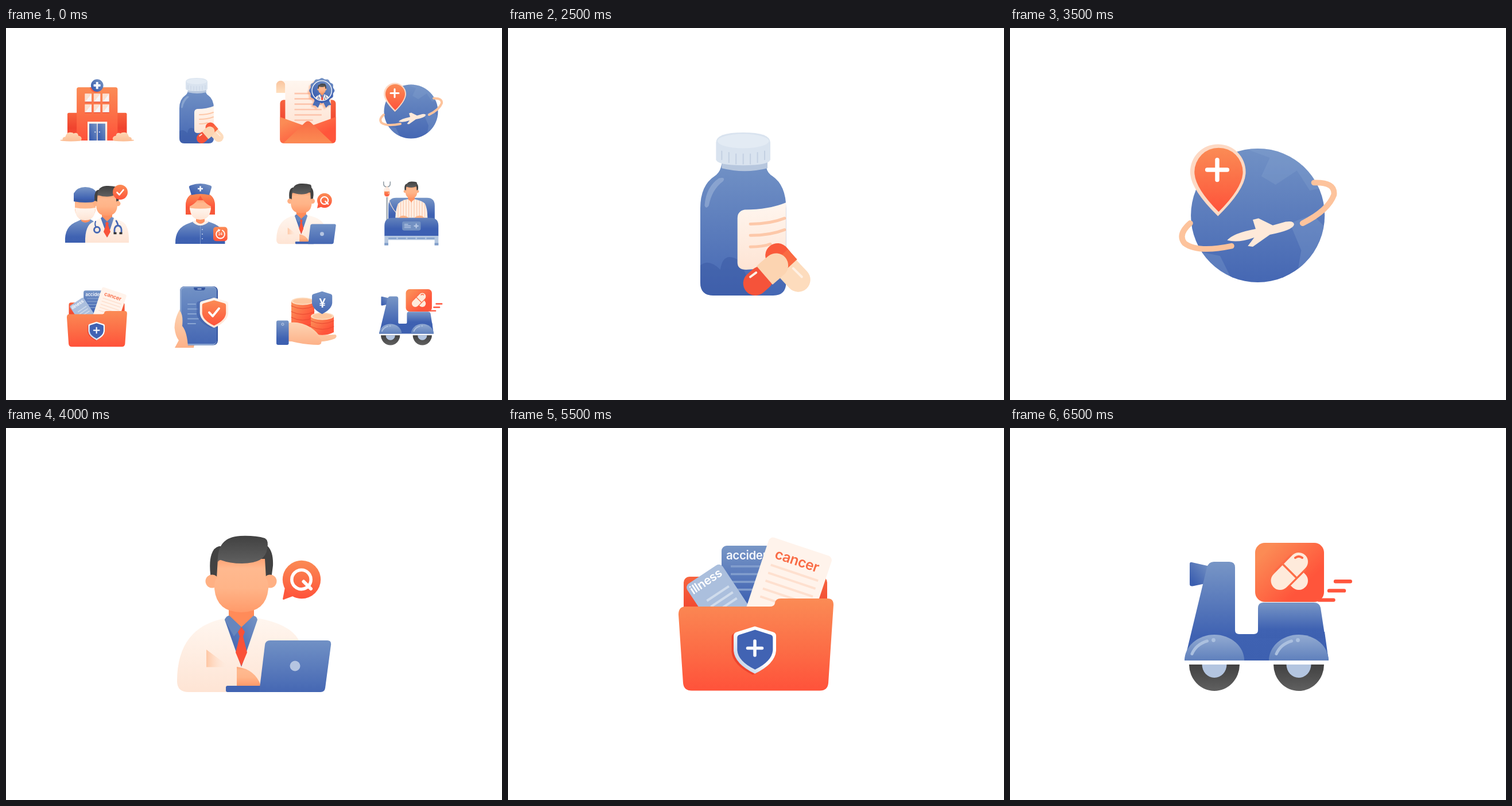
An HTML page that plays this animation: 864x648 px, repeating every 7000 ms.

```html
<!DOCTYPE html>
<html lang="en">
<head>
<meta charset="utf-8">
<title>Medical icons</title>
<style>
html, body { margin: 0; width: 100%; height: 100%; overflow: hidden; background: #fff; }
svg { display: block; width: 864px; height: 648px; }
text { font-family: Inter, "Liberation Sans", sans-serif; font-weight: 600; letter-spacing: -.02em; }
.scene { visibility: hidden; animation: solo 7s step-end infinite; animation-delay: calc(var(--i) * .5s - 5.5s); }
.all { animation-name: all; animation-delay: 0s; }
@keyframes solo { 0% { visibility: visible; } 7.142857%, 100% { visibility: hidden; } }
@keyframes all { 0% { visibility: visible; } 28.571429%, 100% { visibility: hidden; } }
.ln { fill: none; stroke-linecap: round; stroke-linejoin: round; }
</style>
</head>
<body>
<svg viewBox="0 0 864 648">
<defs>
  <linearGradient id="o" x2="0" y2="1"><stop stop-color="#fb8b55"/><stop offset=".55" stop-color="#fc6d46"/><stop offset="1" stop-color="#ff523a"/></linearGradient>
  <linearGradient id="od" x2="1" y2=".9"><stop offset=".15" stop-color="#fb8b55"/><stop offset=".75" stop-color="#ff553b"/></linearGradient>
  <linearGradient id="r" x2="0" y2="1"><stop stop-color="#f7643f"/><stop offset=".55" stop-color="#f0432e"/><stop offset="1" stop-color="#fb573b"/></linearGradient>
  <linearGradient id="flap" x2="0" y2="1"><stop stop-color="#f96b45"/><stop offset=".9" stop-color="#fb8952"/></linearGradient>
  <linearGradient id="b" x2="0" y2="1"><stop stop-color="#7896c6"/><stop offset=".75" stop-color="#3f62b2"/><stop offset="1" stop-color="#3d60b0"/></linearGradient>
  <linearGradient id="bm" x2="0" y2="1"><stop stop-color="#7191c5"/><stop offset="1" stop-color="#4567b3"/></linearGradient>
  <linearGradient id="bd" x1="1" x2="0" y2="1"><stop stop-color="#7895c4"/><stop offset=".85" stop-color="#3c5fb0"/></linearGradient>
  <linearGradient id="bq" x2="0" y2="1"><stop stop-color="#6383bc"/><stop offset=".6" stop-color="#3d60b2"/></linearGradient>
  <linearGradient id="bl" x2="0" y2="1"><stop stop-color="#93abd2"/><stop offset="1" stop-color="#5f80bc"/></linearGradient>
  <linearGradient id="c" x2="0" y2="1"><stop stop-color="#fff6ef"/><stop offset="1" stop-color="#fee4d4"/></linearGradient>
  <linearGradient id="p" x2="0" y2="1"><stop stop-color="#fdd7b5"/><stop offset="1" stop-color="#fcbd94"/></linearGradient>
  <linearGradient id="curl" x2="0" y2="1"><stop stop-color="#f9c49e"/><stop offset="1" stop-color="#ffdfbe"/></linearGradient>
  <linearGradient id="s" x2="0" y2="1"><stop stop-color="#ffa374"/><stop offset=".18" stop-color="#ffb98f"/><stop offset=".55" stop-color="#ffb488"/><stop offset="1" stop-color="#ff9a6a"/></linearGradient>
  <linearGradient id="palm" x2="0" y2="1"><stop stop-color="#fdd3b2"/><stop offset="1" stop-color="#fdb188"/></linearGradient>
  <linearGradient id="h" x2="0" y2="1"><stop stop-color="#414141"/><stop offset="1" stop-color="#606060"/></linearGradient>
  <linearGradient id="fade"><stop stop-color="#fec6a3"/><stop offset="1" stop-color="#fff0e6" stop-opacity="0"/></linearGradient>
  <linearGradient id="w" x1="1" x2="0" y2="1"><stop offset=".5" stop-color="#fff"/><stop offset="1" stop-color="#a9bfe0"/></linearGradient>
  <filter id="soft"><feGaussianBlur stdDeviation="3"/></filter>

  <g id="head">
    <path fill="#424242" d="M357 263Q353 234 358 220Q362 208 371 206H456Q466 216 465 240L462 263z"/>
    <circle cx="359" cy="267" r="11.5" fill="#ffb083"/><circle cx="460" cy="267" r="11.5" fill="#ffb083"/>
    <path fill="url(#s)" d="M367 262L369 228H451L453 262Q457 264 457 280Q453 321 410 321Q367 321 363 280Q363 264 367 262z"/>
    <path fill="url(#h)" d="M369 234Q367 190 408 188Q434 187 451 192Q458 196 455 210Q452 236 411 236Q390 236 374 230Q370 230 369 234z"/>
  </g>

  <g id="pane"><path fill="#e8432c" d="M0 0h29v38h-29z"/><path fill="#f5f6fa" d="M0 0h29v35h-29z"/><path fill="#fddfcd" d="M0 0h29L2 35h-2z"/></g>
  <path id="bush" fill="url(#p)" d="M270 455.500Q271 452 281 452Q279 441 293 440Q297 420 314 420Q325 420 329 425Q347 418 350 435Q364 437 364 448Q363 457 357 458Q315 462 280 458Q271 457 270 455.500z"/>
  <g id="hospital">
    <rect x="302" y="335" width="260" height="121" rx="6" fill="url(#r)"/>
    <path fill="url(#o)" d="M342.500 456V232q0-9 9-9h161q9 0 9 9V456z"/>
    <path fill="#ff5238" opacity=".8" d="M400.500 223A27 27 0 0 0 441 242L432 223z"/>
    <circle cx="432" cy="215" r="27.200" fill="url(#bd)"/>
    <path fill="#f8f8ff" d="M429 199.500h6q2 0 2 2v8.500h8q2 0 2 2v6q0 2-2 2h-8v8.500q0 2-2 2h-6q-2 0-2-2V220h-8.500q-2 0-2-2v-6q0-2 2-2h8.500v-8.500q0-2 2-2z"/>
    <g id="row"><use href="#pane" x="378.700" y="251"/><use href="#pane" x="417.200" y="251"/><use href="#pane" x="455.800" y="251"/></g>
    <use href="#row" y="46.500"/>
    <path fill="url(#c)" d="M390 374h86v82h-86z"/>
    <path fill="url(#bd)" d="M397.500 382h33.500v74h-33.500z"/><path fill="url(#bd)" d="M434.500 382h33.500v74h-33.500z"/>
    <circle cx="423.300" cy="419" r="2.600" fill="#f5f6fa"/><circle cx="442.300" cy="419" r="2.600" fill="#f5f6fa"/>
    <use href="#bush"/><use href="#bush" transform="matrix(-1 0 0 1 864 0)"/>
  </g>

  <g id="bottle">
    <path fill="url(#bm)" d="M302 192V140Q302 124 312 117.500Q316 115 317 109H348Q348 115 352.500 117.500Q362 124 362 140V192Q362 201 353 201H311Q302 201 302 192z"/>
    <path fill="#a3b9db" opacity=".55" d="M305 138Q306 125 315 119Q320 118 318 121Q310 127 308 138Q306 141 305 138z"/>
    <path fill="#35559f" opacity=".45" d="M302 180Q308 175 316 183Q318 169 330 177L340 201H311Q302 201 302 192z"/>
    <path fill="#b7c7de" d="M317 104h32v8q-16 4-32 0z"/>
    <path fill="#d9e3ef" d="M313 94Q313 87 332 87Q351 87 351 94V106Q350 110 332 110Q314 110 313 106z"/>
    <ellipse cx="332" cy="93" rx="18" ry="5" fill="#e3ebf4"/>
    <path class="ln" stroke="#c3d0e2" stroke-width=".8" d="M317 100v6m5-5v7m5-6v7m5-7v7m5-7v7m5-8v7m5-8v6"/>
    <path fill="url(#c)" d="M362 136Q350 141 333 141Q328 142 328 147V178Q328 183 334 183Q352 182 362 178z"/>
    <path class="ln" stroke="#fdc8a9" stroke-width="2" d="M337 151Q351 151 361 147M337 159Q351 159 361 155M337 167Q346 167 351 165"/>
    <path class="ln" stroke="#fa5a3b" stroke-width="17" d="M356 173l5 6"/>
    <path class="ln" stroke="#fddcbd" stroke-width="17" d="M363 182l7.500 8"/>
    <path stroke="#fa6a42" stroke-width="17" d="M357 174.500l6.500 7"/>
    <path class="ln" stroke="#fcd4b1" stroke-width="17" d="M349 185l6-5"/>
    <path class="ln" stroke="#f5533a" stroke-width="17" d="M340.500 192.500l4-3.500"/>
    <path stroke="#fcd4b1" stroke-width="17" d="M347 187l6-5.200"/>
    <path class="ln" stroke="#fff0e3" stroke-width="1.600" d="M367 182l6 6M337 188l4-3"/>
  </g>

  <path id="seal"/>
  <path id="tails" d="M469 280L459.500 302L471 304L482 313L495 284zM527 280L537 301L525 303L515 313L501 284z"/>
  <clipPath id="disc"><circle cx="498" cy="241.500" r="40"/></clipPath>
  <g id="steth" class="ln">
    <path stroke="#3f62b2" stroke-width="2" d="M156 337Q154 343 157 347"/><circle cx="158.500" cy="351.500" r="5" stroke="#4769b4" stroke-width="3"/>
    <path stroke="#4769b4" stroke-width="2.800" d="M192 336Q195 341 195 344Q188 345 189 356M195 344Q202 345 201 356"/>
    <path stroke="#333" stroke-width="3.400" stroke-linecap="butt" d="M187.500 357.500h5M197.500 357.500h5"/>
  </g>
  <g id="doc">
    <path fill="url(#c)" d="M138 374Q137 343 153 337L165 331H188L202 337Q215 343 214 374z"/>
    <path fill="#fe9161" d="M167 321h18v10l-9 7-9-7z"/>
    <path fill="url(#bd)" d="M165 331l3-2 8 8 8-8 4 2-11 33z"/>
    <path fill="#f85339" d="M176 337l3 3-1 3 4 12-6 10-6-10 4-12-1-3z"/>
    <use href="#steth"/>
    <use href="#head" transform="translate(15.600 201.700) scale(.39)"/>
  </g>
  <g id="letter">
    <rect x="324" y="280" width="232" height="180" rx="15" fill="url(#r)"/>
    <path fill="url(#curl)" d="M308 251V219a18.500 18.500 0 0 1 37.500 0v32z"/>
    <path fill="url(#c)" d="M327 200H517q18 0 18 18V400H345.500V219Q345.500 200 327 200z"/>
    <path fill="none" stroke="#fdc6ae" stroke-width="6.400" d="M384 253.500h113M384 275.500h113M384 298h113M384 320.200h113M384 342.500h113M384 364.700h77"/>
    <path fill="url(#od)" d="M324 351L440 393L556 351V445q0 15-15 15H339q-15 0-15-15z"/>
    <path fill="url(#flap)" d="M338 459.800L428 374Q440 363 452 374L543 459.800z"/>
    <g fill="#fe9b70" opacity=".55" filter="url(#soft)" transform="translate(-7 7)"><use href="#tails"/><use href="#seal"/></g>
    <use href="#tails" fill="#4c6fb7"/><use href="#seal" fill="url(#b)"/>
    <circle cx="498" cy="241.500" r="41" fill="url(#bd)" stroke="#fff" stroke-width="3.200"/>
    <g clip-path="url(#disc)"><use href="#doc" transform="translate(357 -10) scale(.807)"/></g>
  </g>

  <clipPath id="ball"><circle cx="705.500" cy="145.500" r="47"/></clipPath>
  <g id="globe">
    <circle cx="705.500" cy="145.500" r="47" fill="url(#bm)"/>
    <g clip-path="url(#ball)" fill="#89a5cf" opacity=".3">
      <path d="M695 98L714 105L708 118L718 124L733 114L742 128L752 126V105L720 92z"/>
      <path d="M728 151L744 145L755 156L744 182L733 188L736 170z"/>
      <path d="M660 170L679 174L686 188L673 193L658 180z"/>
    </g>
    <path class="ln" stroke="#fdc39c" stroke-width="4" d="M658 151Q649 159 654 165Q663 172 687 167M737 151Q755 142 759 131Q760 122 745 122.500"/>
    <path fill="#fee9d9" d="M684 163Q688 158 704 155L702 148.500L706 147.500L716 152.500L725 150Q731 149 731 152Q730 156 714 159L702 167.500L698.500 167L703 161Q692 165 684 163z"/>
    <path fill="#fdd9c4" d="M677.500 146Q658 127 658 115A19.500 19.500 0 0 1 697 115Q697 127 677.500 146z"/>
    <path fill="url(#o)" d="M678 143Q661 126 661 115A17 17 0 0 1 695 115Q695 126 678 143z"/>
    <path class="ln" stroke="#fff" stroke-width="3" d="M670 113.500h14M677 106.500v14"/>
  </g>

  <g id="pair">
    <path fill="url(#b)" d="M103 374Q101 345 124 337L132 333H146Q162 338 166 374z"/>
    <path fill="#fe9161" d="M131 326h15v10q-8 6-15 0z"/>
    <path fill="url(#s)" d="M120 300h36v16q-2 16-18 17q-16-1-18-17z"/>
    <path fill="url(#c)" d="M120 313Q138 316 156 313L154 325Q150 335 138 335Q126 335 122 325z"/>
    <path fill="url(#b)" d="M118 302V288Q124 277 138 277Q153 277 159 288V302Q138 306 118 302z"/>
    <path fill="#355499" opacity=".45" d="M118 297Q138 301 159 297V302Q138 306 118 302z"/>
    <use href="#doc"/>
    <circle cx="199" cy="286" r="13" fill="url(#o)"/>
    <path class="ln" stroke="#fff" stroke-width="2.600" d="M193.500 286.500l4 4 7-8.500"/>
  </g>

  <g id="nurse">
    <path fill="#f7583a" d="M313 325V309Q313 287 338.500 286Q364 287 364 309V325z"/>
    <path fill="url(#b)" d="M295 376Q294 348 319 340L329 336H349L360 340Q383 348 381.500 376z"/>
    <path fill="#fff0e6" d="M325 338Q338 350 353 338L349 335H329z"/>
    <path fill="#fe9161" d="M331 328h15v9q-7 8-15 0z"/>
    <path fill="url(#s)" d="M320 300H357V316Q354 332 338.500 332Q323 332 320 316z"/>
    <path fill="url(#c)" d="M320 313.500Q338.500 316 357 313.500L355 323Q351 334 338.500 334Q326 334 322 323z"/>
    <path fill="url(#o)" d="M313 313Q313 296 324 289H353Q364 296 364 313Q347 309 338.500 292Q330 309 313 313z"/>
    <path fill="url(#bd)" d="M319 278Q318 275 322 274Q338.500 268 355 274Q359 275 358 278L354 291Q338.500 287 323 291z"/>
    <path fill="none" stroke="#f5f7fc" stroke-width="2.600" d="M334 280h9M338.500 275.500v9"/>
    <path stroke="#8fa8d3" stroke-width=".7" d="M338.500 344v32"/>
    <g fill="#c3d1e8"><circle cx="342" cy="351" r="1"/><circle cx="342" cy="359" r="1"/><circle cx="342" cy="367" r="1"/></g>
    <rect x="361" y="346.500" width="24.700" height="24.700" rx="5" fill="url(#o)"/>
    <path class="ln" stroke="#fff" stroke-width="1.900" d="M377 352.600A7.400 7.400 0 1 1 370 352.600"/>
    <path fill="#fff" d="M369 350l4.500 1.500-3 4z"/>
    <text x="373.400" y="361.300" font-size="5.800" text-anchor="middle" fill="#fff">24</text>
  </g>

  <g id="desk">
    <path fill="url(#c)" d="M298 441Q298 346 384 331H437Q506 343 515 382V460H318Q298 460 298 441z"/>
    <path fill="url(#fade)" d="M349 386V416.500H390z"/>
    <path fill="#ff8b59" d="M388 308h44v24l-22 17-22-17z"/>
    <path fill="url(#bd)" d="M381 334Q384 327 389 327L410 347L431 327Q437 328 438 334L410 416z"/>
    <path fill="#6686bd" d="M389 327L410 347L397 363L381 334Q384 327 389 327z"/>
    <path fill="#fa5138" d="M410 346l6 9-3 8 7 28-10 24-10-24 7-28-3-8z"/>
    <path fill="url(#s)" d="M402 416Q434 420 444 449H402z"/>
    <use href="#head"/>
    <path fill="#4264b2" d="M383 452q0-3 3-3h80v11h-80q-3 0-3-3z"/>
    <path fill="url(#bm)" d="M451 378Q452 370 460 370H560Q567 370 566 378L556 453Q555 460 548 460H441z"/>
    <circle cx="503.500" cy="414.500" r="9" fill="#b5c5e1"/>
    <path fill="#fd573c" d="M487 273L482 298Q483 300 486 298L505 291z"/><circle cx="515" cy="264" r="33.200" fill="url(#o)"/>
    <circle cx="514.500" cy="264" r="16.700" fill="none" stroke="#fff" stroke-width="5.500"/>
    <path class="ln" stroke="#fff" stroke-width="6" d="M518.500 267.500L531 280"/>
  </g>

  <clipPath id="top"><path id="shirt" d="M361 345Q363 300 374 280Q388 265 420 259H449Q484 267 497 280Q508 300 509 345z"/></clipPath>
  <g id="bed">
    <path fill="#99a3ab" d="M319.500 245h6v120h-6z"/>
    <path fill="url(#b)" d="M329 355V289q0-36 36-36h141q36 0 36 36v66z"/>
    <path class="ln" stroke="#98a2aa" stroke-width="4.600" d="M307 180V187Q307 203 322 203Q337.500 203 337.500 187V180"/>
    <rect x="319.500" y="199" width="6" height="12" rx="2" fill="#fde0ce"/>
    <rect x="308" y="205" width="28" height="45" rx="13.500" fill="#feeade"/>
    <path fill="url(#o)" d="M310.500 224H334v12a11.800 12 0 0 1-23.500 0z"/>
    <path class="ln" stroke="#fff" stroke-width="2" d="M313 218Q313 212 317 209M329.500 229v6"/>
    <path class="ln" stroke="#fce5d6" stroke-width="3" d="M327 248Q338 292 365 322"/>
    <use href="#shirt" fill="#fff0e5"/>
    <path clip-path="url(#top)" stroke="#fbcdb4" stroke-width="100" stroke-dasharray="3.800 8.500" d="M371.500 305H510"/>
    <path fill="#ff9363" d="M419 246h31v14q-13 6-15.500 16q-3-10-15.500-16z"/>
    <use href="#head" transform="translate(199.600 70.800) scale(.573)"/>
    <path fill="#fcb185" d="M377 346Q384 335 398 335Q414 336 421 346zM449 346Q456 336 472 335Q487 335 494 346z"/>
    <path fill="url(#bq)" d="M311 429V381q0-36 36-36h176q36 0 36 36v48z"/>
    <path fill="#b3c6df" d="M311 428h248v43h-17.500v-24H328.500v24H311z"/>
    <path fill="#7f9dc9" d="M311 461h17.500v10H311zM541.500 461H559v10h-17.500z"/>
    <path stroke="#7f9dc9" stroke-width="6" stroke-dasharray="37 6.800" d="M329 439.300H541.500"/>
    <rect x="392.500" y="362" width="85" height="41" rx="8" fill="#7391c2"/>
    <path class="ln" stroke="#b5c7e4" stroke-width="3.800" d="M403.500 374.700h15M403.500 382.300h27M403.500 389.800h27"/>
    <path class="ln" stroke="#b5c7e4" stroke-width="6" d="M448.500 382.500h17M457 374v17"/>
  </g>

  <path id="shield" d="M430 345.500L462 355.500Q467 357 467 362V388Q465 411 430 428Q395 411 393 388V362Q393 357 398 355.500z"/>
  <g id="folder">
    <rect x="306" y="259" width="250" height="120" rx="10" fill="url(#r)"/>
    <rect x="372" y="205" width="100" height="130" rx="9" fill="url(#b)"/>
    <text x="380" y="229" font-size="20.500" fill="#f5f7fc">accident</text>
    <path stroke="#829ecd" stroke-width="3.600" d="M388 241h70M388 254.500h70M388 268h70M388 281.500h70"/>
    <g transform="translate(308 275.500) rotate(-33.500)">
      <rect width="74" height="110" rx="8" fill="#abbfdd"/>
      <text x="4" y="20.500" font-size="21" fill="#fff">illness</text>
      <path stroke="#d0dcec" stroke-width="4" d="M18 42.500h46M18 55h46M18 67.500h46"/>
    </g>
    <g transform="translate(456.500 188.500) rotate(18.500)">
      <rect width="115.500" height="150" rx="8" fill="#fff3eb"/>
      <text x="18.500" y="34" font-size="24.500" fill="#f96c46">cancer</text>
      <path stroke="#fee0cf" stroke-width="4" d="M17 47h87M17 61.500h87M17 76h87M17 90.500h87M17 105h87"/>
    </g>
    <path fill="url(#o)" d="M297 325Q297 311 309 311H456Q464 311 465 305Q466 297 475 297H557Q567 297 567 308L558 444Q557 457.500 543 457.500H320Q306 457.500 305 444z"/>
    <use href="#shield" x="-3.500" y="2" fill="#ee432d"/><use href="#shield" fill="url(#w)"/>
    <use href="#shield" fill="#4163b3" transform="translate(70 62) scale(.838)"/>
    <path class="ln" stroke="#f7f8fd" stroke-width="5.600" d="M417.500 383.500h25M430 371v25"/>
  </g>

  <g id="phone">
    <path fill="url(#palm)" d="M303 490Q294 505 293.500 522Q295 537 301 544L294 557H327Q332 540 322 520z"/>
    <rect x="303" y="450" width="66" height="102.500" rx="8" fill="#35559f"/>
    <rect x="303" y="450" width="64" height="102.500" rx="8" fill="#8ba5d0"/>
    <rect x="305.500" y="452.500" width="61.500" height="97.500" rx="6" fill="url(#bm)"/>
    <path fill="#35559f" d="M327 452h20q0 5-4 5h-12q-4 0-4-5z"/><path class="ln" stroke="#c8d6ec" stroke-width="1.300" d="M334 454.500h6"/>
    <path class="ln" stroke="#89a5d2" stroke-width="2.200" d="M317 481h13M317 489.500h17M317 498h14M317 506.500h18M317 515h13"/>
    <path fill="url(#palm)" d="M303 493Q309 500 307 519Q316 530 317 557H299Q303 548 299 532z"/>
    <use href="#shield" fill="#3a5aa6" opacity=".5" transform="translate(69.500 249.500) scale(.668 .638)"/>
    <use href="#shield" fill="url(#c)" transform="translate(75.200 249.300) scale(.668 .638)"/>
    <use href="#shield" fill="url(#o)" transform="translate(121.200 289) scale(.561 .536)"/>
    <path class="ln" stroke="#fff" stroke-width="3.800" d="M354 495.500l6 6.500 11-13.500"/>
  </g>

  <g id="coins">
    <path fill="url(#od)" d="M497 476H537V519Q517 529 497 519z"/>
    <path class="ln" stroke="#e94a31" stroke-width="1" d="M497 484Q517 494 537 484M497 494Q517 504 537 494M497 504Q517 514 537 504M497 514Q517 524 537 514"/>
    <ellipse cx="517" cy="476" rx="20" ry="6.500" fill="#fddcbf"/><ellipse cx="517" cy="476" rx="17" ry="4.800" fill="#fdc79f"/>
    <path fill="url(#od)" d="M531 502H571V530Q551 540 531 530z"/>
    <path class="ln" stroke="#e94a31" stroke-width="1" d="M531 510Q551 520 571 510M531 520Q551 530 571 520"/>
    <ellipse cx="551" cy="502" rx="20" ry="6.500" fill="#fddcbf"/><ellipse cx="551" cy="502" rx="17" ry="4.800" fill="#fdc79f"/>
    <use href="#shield" fill="url(#bm)" transform="translate(345.500 294) scale(.477)"/>
    <text x="551" y="486.500" font-size="21" text-anchor="middle" fill="#fff">¥</text>
    <path fill="url(#p)" d="M490 514Q507 510 524 518Q538 525 545 535L574 534Q578 537 573 541Q558 547 545 546L490 546z"/>
    <path fill="url(#palm)" d="M490 515Q506 511 522 519Q537 528 549 543Q551 552 544 552Q519 552 490 544z"/>
    <rect x="471" y="509.500" width="21.500" height="42.500" rx="3" fill="url(#b)"/>
    <circle cx="482" cy="516" r="2" fill="none" stroke="#c4d2e9"/>
  </g>

  <g id="wheel">
    <path fill="url(#bl)" d="M304 405A52 45 0 0 1 408 405z"/>
    <path class="ln" stroke="#abc0df" stroke-width="5" d="M317 393.500Q324 377 343.500 371"/><circle cx="354.500" cy="369.500" r="3.400" fill="#abc0df"/>
    <path fill="url(#h)" d="M312 412H400A44 46 0 0 1 312 412z"/><path fill="#b3c5e0" d="M334.500 412H377.500A21.500 23 0 0 1 334.500 412z"/>
  </g>
  <g id="scooter">
    <path fill="url(#bd)" d="M313 237Q313 233 317 234L348 241L340 271L318 275.500Q313 276 313 272z"/>
    <path fill="url(#b)" d="M304 405L343 243Q346 233 355 233H382Q392 233 392 243V352Q392 359 399 359H425L548 355L555 405z"/>
    <path fill="url(#b)" d="M425 359Q432 359 432 352V314Q432 304 441 304H529Q539 304 541 313L549 366H425z"/>
    <use href="#wheel"/><use href="#wheel" x="147"/>
    <path class="ln" stroke="#ff553d" stroke-width="6.400" d="M538 299.600h25.500M556 283.400h26M567 267.300h25.800"/>
    <rect x="427" y="200" width="120" height="103" rx="17" fill="url(#od)"/>
    <g class="ln" stroke="#feeadb" stroke-width="32">
      <path d="M493 256l10 10"/><path stroke="#fd6a46" stroke-width="39" stroke-linecap="butt" d="M503 233L474 262"/>
      <path d="M503 233L470.500 266"/><path stroke="#fd6f48" stroke-width="3.500" stroke-linecap="butt" d="M474 236l25 25"/>
      <path stroke="#fd6744" stroke-width="4" d="M497 226Q503 221.500 509 226"/>
    </g>
  </g>
</defs>

<g class="scene all">
  <use href="#hospital" transform="translate(-13.200 14.500) scale(.398)"/><use href="#bottle"/>
  <use href="#letter" transform="translate(341.800 8) scale(.4185)"/><use href="#globe"/>
  <use href="#pair"/><use href="#nurse"/>
  <use href="#desk" transform="translate(355.800 198.400) scale(.3866)"/>
  <use href="#bed" transform="translate(541.400 199.900) scale(.379)"/>
  <use href="#folder" transform="translate(-9.400 377.600) scale(.3885)"/><use href="#phone"/>
  <use href="#coins"/><use href="#scooter" transform="translate(535.100 379.400) scale(.378)"/>
</g>
<g class="scene" style="--i:1"><use href="#hospital"/></g>
<g class="scene" style="--i:2"><use href="#bottle" transform="translate(-417 -34.600) scale(2.490)"/></g>
<g class="scene" style="--i:3"><use href="#letter"/></g>
<g class="scene" style="--i:4"><use href="#globe" transform="translate(-1318 -34.400) scale(2.480)"/></g>
<g class="scene" style="--i:5"><use href="#desk"/></g>
<g class="scene" style="--i:6"><use href="#nurse" transform="translate(-445.800 -510.600) scale(2.578)"/></g>
<g class="scene" style="--i:7"><use href="#bed"/></g>
<g class="scene" style="--i:8"><use href="#folder"/></g>
<g class="scene" style="--i:9"><use href="#phone" transform="translate(-418.800 -931.800) scale(2.500)"/></g>
<g class="scene" style="--i:10"><use href="#scooter"/></g>
</svg>
<script>
// Scalloped rim of the rosette: twelve lobes
const rim = Array.from({ length: 120 }, (_, i) => {
  const a = i * Math.PI / 60, r = 50.700 + 2.200 * Math.cos(12 * a);
  return (498 + r * Math.cos(a)).toFixed(1) + " " + (241.500 + r * Math.sin(a)).toFixed(1);
});
document.getElementById("seal").setAttribute("d", "M" + rim.join("L") + "z");
</script>
</body>
</html>
```
